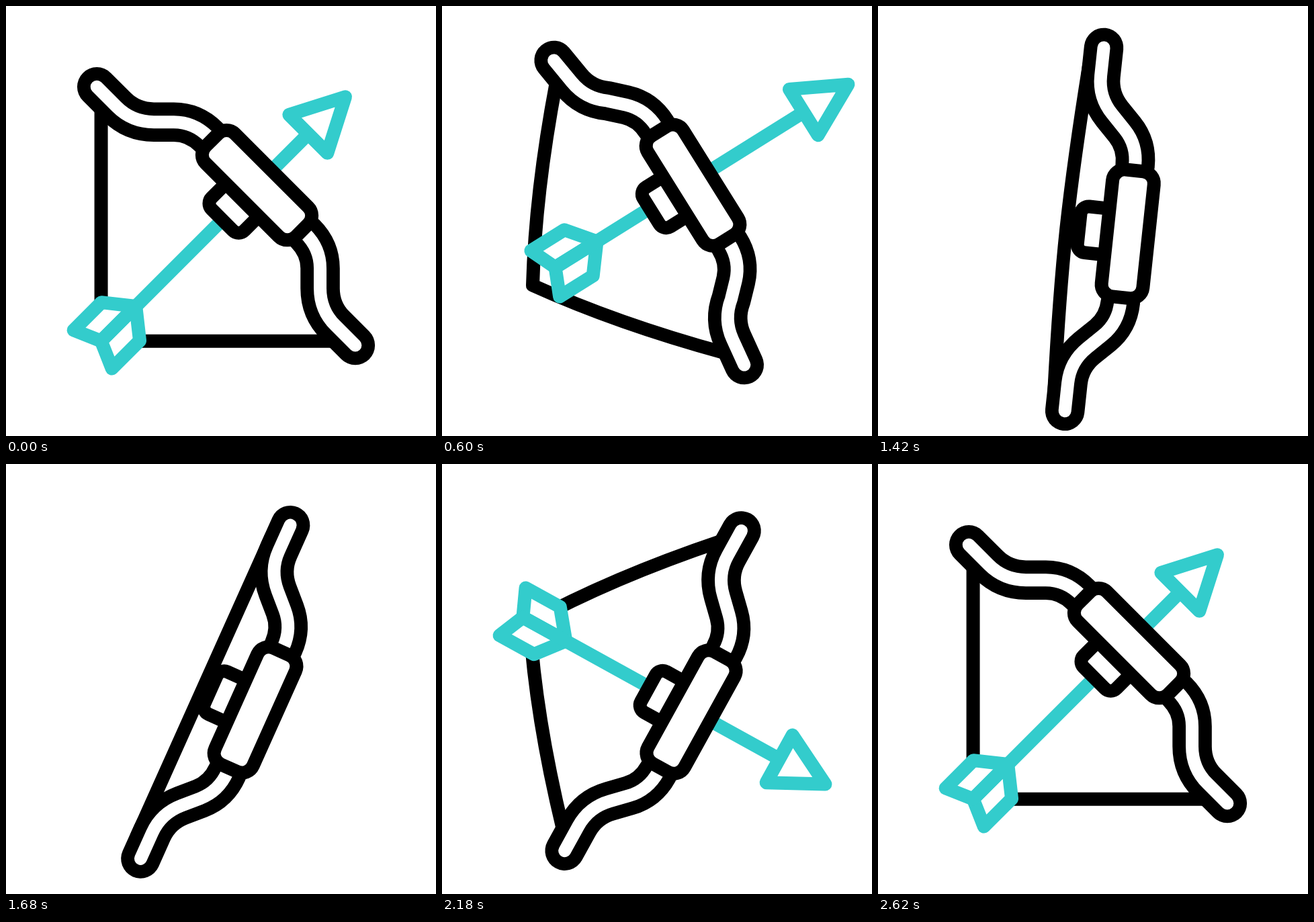
Recreate the animation shown at these times as an HTML page with a canvas. Size 640 px wide and 640 px high, loop 3000 ms.

```html
<!DOCTYPE html>
<html lang="en">
<head>
<meta charset="utf-8">
<title>Bow and arrow</title>
<style>
  html, body { margin: 0; width: 100%; height: 100%; overflow: hidden; background: #fff; }
  canvas { display: block; }
</style>
</head>
<body>
<canvas id="stage" width="640" height="640"></canvas>
<script>
const ctx = document.getElementById('stage').getContext('2d');
const LOOP = 3000, BLACK = '#000', CYAN = '#33cccc', WHITE = '#fff';
const REST = -84, DRAWN = -328, EXTRA = 19;

const lerp = (a, b, p) => a + (b - a) * p;
const span = (t, from, to) => Math.min(1, Math.max(0, (t - from) / (to - from)));
const smooth = p => p * p * (3 - 2 * p);

// Cubic bezier easing (.4, 0, .2, 1), solved by bisection.
function swing(x) {
  let lo = 0, hi = 1;
  for (let i = 0; i < 24; i++) {
    const s = (lo + hi) / 2, r = 1 - s;
    if (1.2 * s * r * r + 0.6 * s * s * r + s * s * s < x) lo = s; else hi = s;
  }
  return smooth(lo);
}

function pose(t) {
  const aim = smooth(span(t, 220, 440));
  const turn = swing(span(t, 990, 2066)), sink = swing(span(t, 1061, 1855));
  const back = smooth(span(t, 2147, 2620)), rise = smooth(span(t, 2180, 2620));
  const release = span(t, 440, 813) ** 1.65;
  const reload = smooth(span(t, 1860, 2320));

  let nock = lerp(DRAWN - EXTRA * aim, REST, release), skew = 0;
  if (t >= 813 && t < 1860) {
    const fade = 1 - (t - 900) / 960;
    nock = REST + 17 * fade * Math.cos((t - 900) / 347 * 2 * Math.PI);
    skew = 25 * fade ** 3;
  } else if (t >= 1860) {
    nock = lerp(REST, DRAWN, reload);
  }

  let shift = -EXTRA * aim;
  if (t > 440) shift += 0.00418 * (t - 440) ** 2;
  if (t > 1400) shift = 336 * (Math.max(0, 2320 - t) / 400) ** 2;

  return {
    angle: t < 2140 ? lerp(lerp(-45, -32, aim), 30, turn) : lerp(30, -45, back),
    x: lerp(373.5, 371, sink - rise),
    y: lerp(266.7, 369, sink - rise),
    flex: 10 * aim * (1 - release) * Math.PI / 180,
    nock, skew, shift
  };
}

function ink(color, width, fill) {
  if (fill) { ctx.fillStyle = fill; ctx.fill(); }
  ctx.strokeStyle = color;
  ctx.lineWidth = width;
  ctx.stroke();
}

function poly(points, color, fill) {
  ctx.beginPath();
  points.forEach(p => ctx.lineTo(...p));
  if (fill) ctx.closePath();
  ink(color, 20, fill);
}

function box(x, y, w, h, r) {
  ctx.beginPath();
  ctx.roundRect(x, y, w, h, r);
  ink(BLACK, 20, WHITE);
}

// Rotates a point on the outer part of the upper limb about its bend.
function bend(x, y, flex) {
  const dx = x + 34, dy = y + 178, c = Math.cos(flex), s = Math.sin(flex);
  return [-34 + dx * c + dy * s, -178 - dx * s + dy * c];
}

function drawString({ nock, skew, flex }) {
  const [ax, ay] = bend(REST, -244, flex);
  const pull = span(nock, REST, DRAWN);
  const curve = 1 - pull;
  const cx = lerp((ax + nock) / 2, nock, curve);
  const cy = lerp(ay / 2, -100, curve);
  ctx.beginPath();
  ctx.moveTo(ax, ay);
  ctx.quadraticCurveTo(cx, cy, nock, skew);
  ctx.quadraticCurveTo(cx, -cy, ax, -ay);
  ink(BLACK, 20);
}

function drawArrow(shift) {
  ctx.save();
  ctx.translate(shift, -0.0536 * Math.max(0, shift));
  for (const s of [-1, 1])
    poly([[DRAWN, 0], [-345.5, 40.3 * s], [-287, 40.3 * s], [-255, 0]], CYAN, WHITE);
  poly([[DRAWN, 0], [108, 0]], CYAN);
  poly([[186, 0], [108, -40.3], [108, 40.3]], CYAN, WHITE);
  ctx.restore();
}

function drawLimb(side, flex) {
  ctx.save();
  ctx.scale(1, side);
  ctx.beginPath();
  ctx.moveTo(...bend(-65, -272, flex));
  ctx.lineTo(...bend(-65, -230, flex));
  ctx.bezierCurveTo(...bend(-65, -209, flex), ...bend(-57, -190, flex), ...bend(-42, -175, flex));
  ctx.lineTo(-21, -154);
  ctx.bezierCurveTo(-7, -140, 0, -122, 0, -102);
  ink(BLACK, 58.5);
  ink(WHITE, 19);
  ctx.restore();
}

function draw(t) {
  const p = pose(t);
  ctx.fillStyle = WHITE;
  ctx.fillRect(0, 0, 640, 640);
  ctx.save();
  ctx.lineCap = ctx.lineJoin = 'round';
  ctx.translate(p.x, p.y);
  ctx.rotate(p.angle * Math.PI / 180);
  drawString(p);
  drawArrow(p.shift);
  box(-73, -34.5, 60, 69, 12);
  drawLimb(1, p.flex);
  drawLimb(-1, p.flex);
  box(-31, -95, 62, 190, 18);
  ctx.restore();
}

const start = performance.now();
function tick() {
  draw((performance.now() - start) % LOOP);
  requestAnimationFrame(tick);
}
tick();
</script>
</body>
</html>
```
